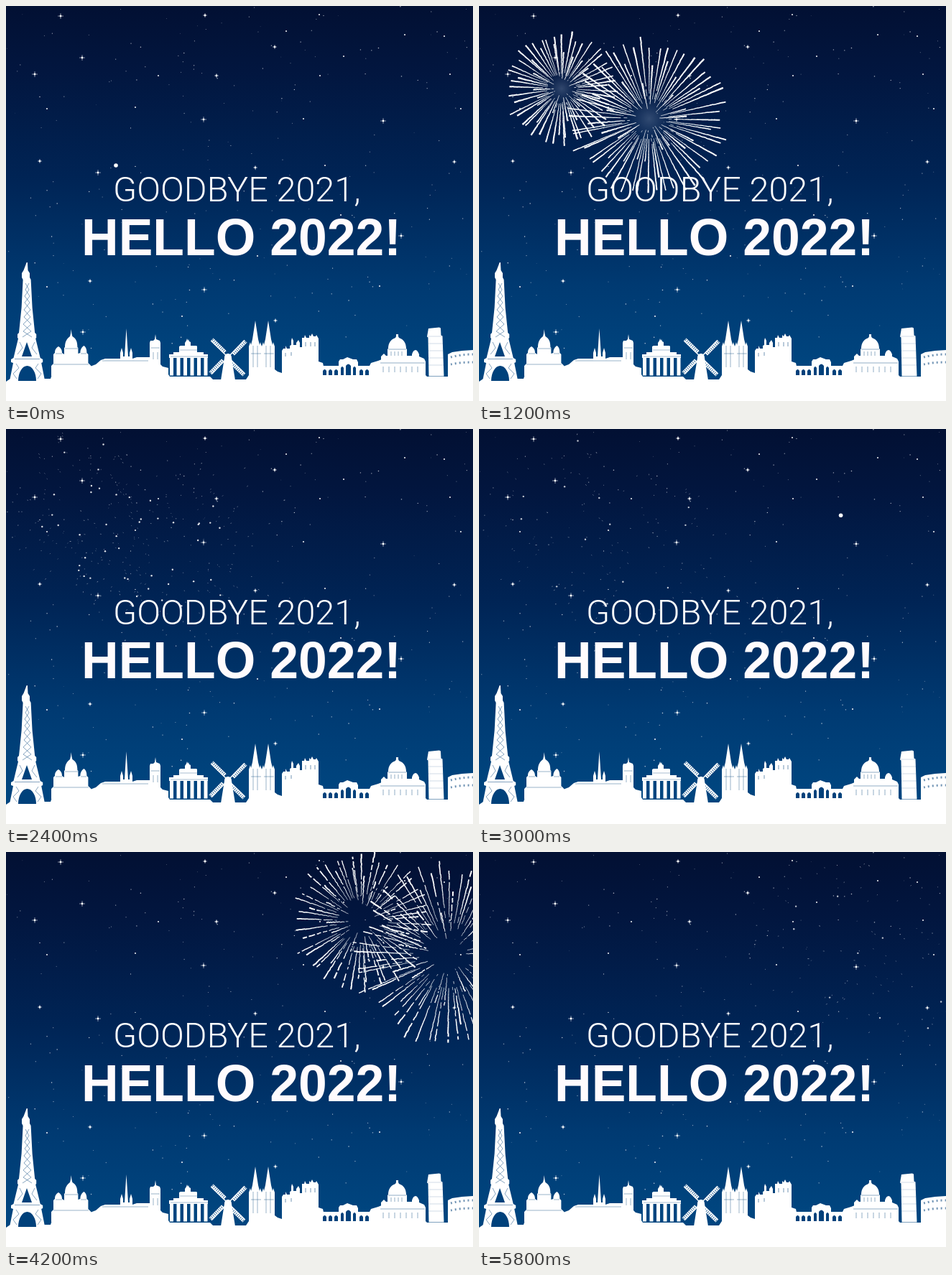
Write an HTML page with a canvas that moves like this. It is 650 px wide and 550 px high and loops after 6000 ms.

```html
<!DOCTYPE html>
<html lang="en">
<head>
<meta charset="utf-8">
<title>Goodbye 2021, Hello 2022!</title>
<style>
  html, body { margin: 0; width: 100%; height: 100%; overflow: hidden; }
  body {
    position: relative;
    background: linear-gradient(#021033 0, #02163f 90px, #002455 240px, #003a72 390px, #00457f 500px);
  }
  canvas, svg { position: absolute; left: 0; top: 0; display: block; }
  .city { fill: #fff; }
  .gap { fill: #00417b; }
  .line { fill: none; stroke: #00417b; }
  .rod { fill: none; stroke: #fff; }
  .light { font: 300 48.5px Roboto, "Open Sans", sans-serif; fill: #fff; }
  .bold { font: bold 71.5px "Liberation Sans", Arial, sans-serif; fill: #fffbfd; }
</style>
</head>
<body>
<canvas id="sky" width="650" height="550"></canvas>
<svg width="650" height="550" viewBox="0 0 650 550">
  <defs>
    <g id="blade">
      <path class="rod" stroke-width="1.5" d="M0 0V-33"/>
      <path class="rod" stroke-width="5" stroke-dasharray="2 .7" d="M2 -8V-33"/>
      <path class="rod" stroke-width=".8" d="M4.5 -8V-33"/>
    </g>
  </defs>

  <g class="city">
    <path d="M0 523 L6 519 H62 L64 513 H226 L228 516 H284 L288 520 H334 L338 514 H584 L586 516 H650 V550 H0Z"/>

    <!-- iron tower -->
    <path d="M28.7 357h1.2l.6 11 2.5 4v6l1.6 3 2 39 3.6 35 2 2v5l-1 1 6.5 27 3.5 2v4l-2 1 5 25H5l5-25-3-1v-4l3.500-2 6.500-27-1-1v-5l2-2 3.600-35 2-39-1.600-3v-6l2.500-4z"/>
    <path class="gap" d="M29 468l7 20H22zM17 522a12.500 21 0 0 1 25 0z"/>
    <path class="line" stroke-width=".8" opacity=".6" d="M27 386l5 9-6 9 7 9-8 10 9 10-10 10 11 10-12 8M32 386l-5 9 6 9-7 9 8 10-9 10 10 10-11 10 12 8M19 468l4 8-7 9M40 468l-4 8 7 9M14 498l4 6-8 8 5 7M45 498l-4 6 8 8-5 7M12 491.500h35"/>

    <!-- hilltop basilica -->
    <path d="M63 515v-14l3-3v-13l2-2c0-5 2-7 5-9 3 2 5 4 5 9l3 2v-9l1-1c0-8 3-12 7-15l1-4 .7-6 .7 6 1 4c5 3 7 7 7 15l1 1v8l3-1c0-5 2-8 5-10 3 2 4 5 4 10l2 2v12l4 4v15z"/>
    <path class="line" stroke-width=".8" opacity=".5" d="M82 477h18M69 484h9M104 484h8M66 499h49"/>

    <!-- cathedral with slender spire -->
    <path d="M117 515v-13l8-3 7-6 6-2h21v-8l2-7 2 7v5h2l1-16 1.500-23 1.500 23 1 16h2v-5l2-7 2 7v8l6-2h18v-20l1-3h4l2-2 1-7 1 7 5 2 1 3v30l3 3 8 2v15z"/>
    <path class="line" stroke-width=".8" opacity=".5" d="M134 494h64M202 476h12M205 482v10M211 482v10"/>

    <!-- columned gate -->
    <path d="M227 490v-5h6v-3h8v-8l2-1h6v-4l2-3 1-3 1 3 1-2 1 3 2 1v5h8l1 1v8h9v3h6v5z"/>
    <path class="rod" stroke-width="25" stroke-dasharray="5 4.500" d="M228 502h54"/>
    <path class="line" stroke-width=".7" opacity=".5" d="M229 488h52M242 479h25"/>

    <!-- windmill -->
    <path d="M304 490c0-4 2-6 5-6s5 2 5 6l5 31h-20z"/>
    <use href="#blade" transform="translate(309 489) rotate(-46)"/>
    <use href="#blade" transform="translate(309 489) rotate(44)"/>
    <use href="#blade" transform="translate(309 489) rotate(134)"/>
    <use href="#blade" transform="translate(309 489) rotate(224)"/>

    <!-- twin spires -->
    <path d="M338 516v-42l2-6 1 4 2-8 4-26 4 26 2 8 1-4 2 6 2-6 1 4 2-8 4-26 4 26 2 8 1-4 2 6v32l4 3 6 2v6z"/>
    <path class="line" stroke-width=".8" opacity=".5" d="M344 473v30M350 473v30M362 473v30M368 473v30M341 484h14M359 484h14"/>

    <!-- old castle -->
    <path d="M384 516v-36l2-3h3v-4l2 4h4v-4l2-1v-6l1-4 2 4v6h4v-3l3-4 2 4v6h3v-13h3l1-4 2 4h4v-4l2 2 2-4 2 4h3l1-2 3 5v32l6 2 4 18z"/>
    <path class="line" stroke-width="1" opacity=".55" d="M389 483v5M397 482v5M417 468v6M424 468v6M430 468v6"/>

    <!-- arcade -->
    <path d="M436 516v-17l5 2h22v-6l2-3h4l6-3 8 3h5l2 4v5h16l2-4 10-3 5-2v24z"/>
    <path class="gap" d="M441 514v-6q2.500-4 5 0v6zM449 514v-6q2.500-4 5 0v6zM457 514v-6q2.500-4 5 0v6zM466 514v-10q2-4 4 0v10zM473 514v-13q3.500-5 7 0v13zM483 514v-10q2-4 4 0v10zM492 514v-6q2.500-4 5 0v6zM500 514v-6q2.500-4 5 0v6z"/>

    <!-- great dome -->
    <path d="M518 516v-20l4-3v-5l4-4 3 3h2v-9l1-1c0-8 4-13 10-15l1-2v-3h3v3l1 2c6 2 10 7 10 15l1 1v9h7v-2c1-4 3-6 5-6s4 3 5 6v3l7 3 2 4v21z"/>
    <path class="line" stroke-width=".8" opacity=".55" d="M532 478h25M536 481v6M541 481v6M546 481v6M551 481v6M521 497h62M525 502v8M533 502v8M541 502v8M549 502v8M557 502v8M565 502v8M573 502v8"/>

    <!-- leaning tower -->
    <path d="M588 449l15-1.500 2 1 .5 10 2 1 2 56h-21l-1-54-1.500-1z"/>
    <path class="line" stroke-width=".6" opacity=".3" d="M587 460h20M588 470h20M588 480h20M588 490h21M588 500h21"/>

    <!-- arena -->
    <path d="M615 516v-31l6-3 14-2 15-1v37z"/>
    <path class="line" stroke-width="3" stroke-dasharray="2 4" opacity=".55" d="M619 489q14-4 31-4M619 499q14-3 31-3"/>
  </g>

  <text class="light" x="149" y="272">GOODBYE 2021,</text>
  <text class="bold" x="105" y="347">HELLO 2022!</text>
</svg>

<script>
const LOOP = 6000, STEP = 200, W = 650, H = 550;
const canvas = document.getElementById("sky");
const ctx = canvas.getContext("2d");
const TAU = Math.PI * 2;

function random(seed) {
  return () => {
    seed = (seed + 0x6D2B79F5) | 0;
    let t = Math.imul(seed ^ (seed >>> 15), 1 | seed);
    t = (t + Math.imul(t ^ (t >>> 7), 61 | t)) ^ t;
    return ((t ^ (t >>> 14)) >>> 0) / 4294967296;
  };
}

function dot(c, x, y, r, alpha = 1) {
  c.globalAlpha = alpha;
  c.beginPath();
  c.arc(x, y, r, 0, TAU);
  c.fill();
}

const clamp = v => Math.max(0, Math.min(1, v));

// Sparkling stars as x, y pairs, then plain bright ones.
const sparkles = [76,14, 277,13, 106,72, 374,57, 275,158, 47,216, 128,232, 347,225,
  525,160, 624,217, 550,320, 117,383, 276,395, 375,438, 40,95, 293,97, 107,454];
const bright = [212,97, 57,143, 180,141, 414,157, 437,97, 444,222, 633,143, 618,95,
  466,291, 350,348, 57,391, 436,12, 390,35, 555,40, 610,42, 470,70, 520,390, 245,432];

function paintStars() {
  const layer = document.createElement("canvas");
  layer.width = W;
  layer.height = H;
  const c = layer.getContext("2d"), rnd = random(21);
  c.fillStyle = c.strokeStyle = "#fff";
  for (let i = 0; i < 230; i++) {
    dot(c, rnd() * W, rnd() * 480, 0.4 + rnd() * 0.4, 0.25 + rnd() * 0.6);
  }
  for (let i = 0; i < bright.length; i += 2) dot(c, bright[i], bright[i + 1], 1.1, 0.9);
  for (let i = 0; i < sparkles.length; i += 2) {
    const x = sparkles[i], y = sparkles[i + 1], arm = i % 4 ? 3 : 4;
    dot(c, x, y, 1.4);
    c.globalAlpha = 0.65;
    c.lineWidth = 0.8;
    c.beginPath();
    c.moveTo(x - arm, y);
    c.lineTo(x + arm, y);
    c.moveTo(x, y - arm);
    c.lineTo(x, y + arm);
    c.stroke();
  }
  return layer;
}

function makeRays(count, seed) {
  const rnd = random(seed);
  return Array.from({ length: count }, (_, i) => ({
    angle: (i + rnd() * 0.8) / count * TAU,
    reach: i % 3 === 2 ? 0.4 + rnd() * 0.4 : 0.84 + rnd() * 0.16,
    width: 0.75 + rnd() * 0.5,
    bits: Array.from({ length: 18 }, () => ({ life: rnd(), wobble: rnd() - 0.5 }))
  }));
}

// Radius follows size * (1 - e^(-rate * age)), with ages counted in steps.
const shells = [
  { size: 180, rate: 0.147, start: 1.94, rays: makeRays(66, 5) },
  { size: 200, rate: 0.192, start: 1.55, rays: makeRays(78, 12) }
];

function drawShell(shell, x, y, age) {
  const t = age - shell.start;
  if (t <= 0) return;
  const radius = shell.size * (1 - Math.exp(-shell.rate * t));
  const decay = clamp((age - 7.5) / 3.5);
  const late = clamp((age - 11) / 5);
  const tail = Math.min(0.42, 0.1 + Math.max(0, age - 3.5) * 0.07);
  const thick = 2.3 - 0.6 * clamp((age - 4) / 4);
  const keep = 0.1 + 0.76 * decay + 0.11 * late;
  const drop = 0.12 * Math.max(0, age - 6) ** 2;

  const glow = clamp((7 - age) / 3) * 0.8;
  if (glow) {
    const g = ctx.createRadialGradient(x, y, 0, x, y, radius * 0.3);
    g.addColorStop(0, "rgba(205,222,245,.9)");
    g.addColorStop(1, "rgba(150,185,225,0)");
    ctx.globalAlpha = glow;
    ctx.fillStyle = g;
    ctx.fillRect(x - radius, y - radius, radius * 2, radius * 2);
  }

  ctx.fillStyle = ctx.strokeStyle = "#fff";
  for (const ray of shell.rays) {
    const cos = Math.cos(ray.angle), sin = Math.sin(ray.angle);
    const far = radius * ray.reach, span = far * (1 - tail) / ray.bits.length;
    ray.bits.forEach((bit, i) => {
      if (bit.life < keep && (age > 6 || i < 3)) return;
      const share = (i + 1) / ray.bits.length;
      const from = far * tail + span * i;
      const to = from + span * (1.1 - 0.75 * decay);
      const shift = bit.wobble * clamp((age - 4) / 5) * (1 + 3 * decay);
      const px = x - sin * shift, py = y + cos * shift + drop;
      ctx.globalAlpha = 1 - 0.45 * decay;
      ctx.lineWidth = Math.max(0.6, thick * ray.width * (0.3 + 0.7 * share) * (1 - 0.45 * decay));
      ctx.beginPath();
      ctx.moveTo(px + cos * from, py + sin * from);
      ctx.lineTo(px + cos * to, py + sin * to);
      ctx.stroke();
      if (decay === 1 && bit.wobble > 0.32) {
        dot(ctx, px + cos * from * 0.8, py + sin * from * 0.8, 1.2, 0.9 - 0.2 * late);
      }
    });
  }
}

// The first shell climbs as a single spark before both open.
function drawPair(age, x1, y1, x2, y2) {
  if (age < 0 || age > 15.9) return;
  const left = 1 - age / shells[0].start;
  ctx.fillStyle = "#fff";
  if (left > 0) dot(ctx, x1 + 38 * left, y1 + 107 * left, 2.8);
  drawShell(shells[0], x1, y1, age);
  drawShell(shells[1], x2, y2, age);
}

const stars = paintStars();

function draw() {
  const step = Math.floor(performance.now() % LOOP / STEP);
  ctx.globalAlpha = 1;
  ctx.clearRect(0, 0, W, H);
  ctx.drawImage(stars, 0, 0);
  drawPair(step, 115, 115, 237, 157);
  drawPair(step - 13.5, 495, 96, 617, 143);
  requestAnimationFrame(draw);
}
draw();
</script>
</body>
</html>
```
